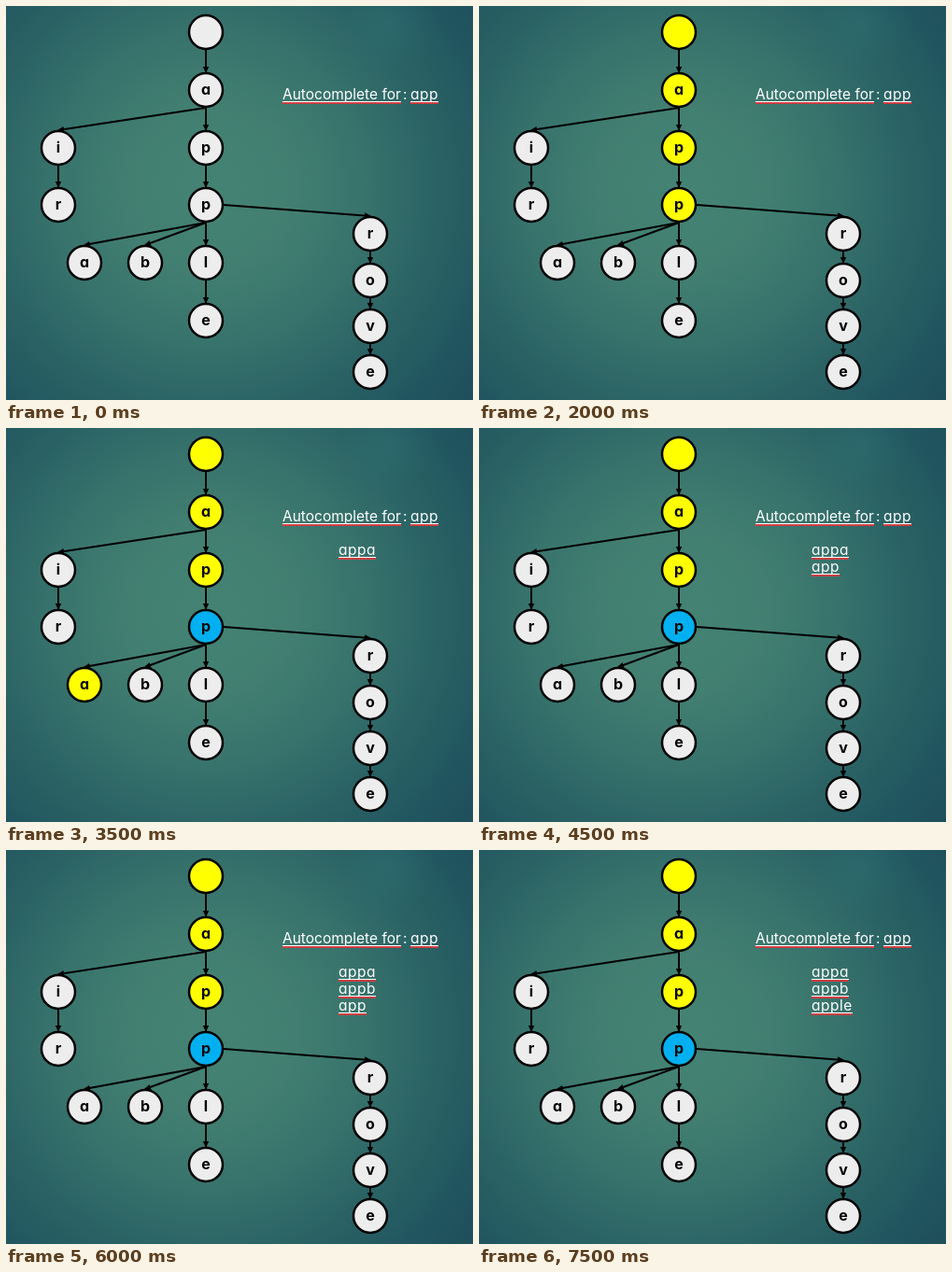
Animation, 500 px wide and 422 px high, one loop 8000 ms. Source, as an HTML page:

```html
<!DOCTYPE html>
<html lang="en">
<head>
<meta charset="utf-8">
<title>Trie autocomplete</title>
<style>
  html, body { margin: 0; width: 100%; height: 100%; overflow: hidden; }
  #stage {
    position: relative; width: 500px; height: 422px; overflow: hidden;
    background:
      radial-gradient(circle at 410px 18px, rgba(50, 120, 125, .35), rgba(50, 120, 125, 0) 50px),
      radial-gradient(circle at 218px 195px, #448373 0, #427f71 90px, #37726c 170px, #2a6264 245px, #215660 310px, #1d4d59 370px);
  }
  svg { position: absolute; inset: 0; }
  line { stroke: #000; stroke-width: 2; }
  circle { fill: #ededed; stroke: #000; stroke-width: 2.5; }
  text, .word {
    font-family: Inter, "Open Sans", sans-serif;
    font-feature-settings: "cv11" 1;
  }
  text { font-size: 16px; font-weight: 700; text-anchor: middle; }
  .word {
    position: absolute; color: #fff; font-size: 15.5px; line-height: 18px;
    white-space: pre;
  }
  .short { letter-spacing: .5px; }
  .checked::before, .checked::after {
    content: ""; position: absolute; left: 0; right: 0; height: 1px;
  }
  .checked::before { top: 16px; background: #fff; }
  .checked::after {
    top: 17px; height: 1.5px;
    background: repeating-linear-gradient(90deg, #e0383c 0 3px, #8f5552 3px 4px);
  }
  .word:empty { display: none; }
</style>
</head>
<body>
<div id="stage">
  <svg width="500" height="422" viewBox="0 0 500 422">
    <defs>
      <marker id="tip" markerUnits="userSpaceOnUse" markerWidth="8" markerHeight="8" refX="6" refY="4" orient="auto">
        <path d="M0 .8L7 4L0 7.2Z"/>
      </marker>
    </defs>
    <g id="edges"></g>
    <g id="nodes"></g>
  </svg>
  <span class="word checked" style="left:296px;top:86px">Autocomplete for</span>
  <span class="word" style="left:425px;top:86px">:</span>
  <span class="word checked short" style="left:433px;top:86px">app</span>
</div>
<script>
const LOOP = 8000, STEP = 500;
const YELLOW = '#ffff00', BLUE = '#00b0f0', PLAIN = '#ededed';
const stage = document.getElementById('stage');

// Each node is keyed by the prefix it spells.
const places = {
  '': [214, 28], a: [214, 90], ai: [56, 152], air: [56, 213],
  ap: [214, 152], app: [214, 213], appa: [84, 275], appb: [149, 275],
  appl: [214, 275], apple: [214, 337],
  appr: [390, 244], appro: [390, 294], approv: [390, 343], approve: [390, 392]
};

// Visited prefix, whether the branch point is marked, listed words.
const steps = [
  [null, 0, ''], ['', 0, ''], ['a', 0, ''], ['ap', 0, ''],
  ['app', 0, ''], ['app', 1, ''],
  ['app', 1, 'app'], ['appa', 1, 'appa'], ['app', 1, 'appa'],
  ['app', 1, 'appa app'], ['appb', 1, 'appa appb'], ['app', 1, 'appa appb'],
  ['app', 1, 'appa appb app'], ['appl', 1, 'appa appb appl'],
  ['apple', 1, 'appa appb apple'], ['app', 1, 'appa appb apple']
];

function add(parent, tag, attrs, label = '') {
  const el = document.createElementNS('http://www.w3.org/2000/svg', tag);
  for (const key in attrs) el.setAttribute(key, attrs[key]);
  el.textContent = label;
  return document.getElementById(parent).appendChild(el);
}

const circles = {};
for (const [key, [x, y]] of Object.entries(places)) {
  if (key) {
    const [px, py] = places[key.slice(0, -1)];
    const side = key === 'appr';
    add('edges', 'line', {
      x1: side ? px + 19 : px, y1: side ? py : py + 19,
      x2: x, y2: y - 19, 'marker-end': 'url(#tip)'
    });
  }
  circles[key] = add('nodes', 'circle', { cx: x, cy: y, r: 18 });
  add('nodes', 'text', { x, y: y + 5 }, key.slice(-1));
}

const rows = [0, 1, 2].map(i => {
  const row = document.createElement('span');
  row.className = 'word checked short';
  row.style.cssText = `left:356px;top:${122 + 18 * i}px`;
  return stage.appendChild(row);
});

function show([visited, marked, list]) {
  for (const key in circles) {
    const onPath = visited !== null && visited.startsWith(key);
    circles[key].style.fill = marked && key === 'app' ? BLUE : onPath ? YELLOW : PLAIN;
  }
  const words = list.split(' ');
  rows.forEach((row, i) => { row.textContent = words[i] || ''; });
}

let shown = -1;
function tick() {
  const now = Math.floor(performance.now() % LOOP / STEP);
  if (now !== shown) show(steps[shown = now]);
  requestAnimationFrame(tick);
}
tick();
</script>
</body>
</html>
```
